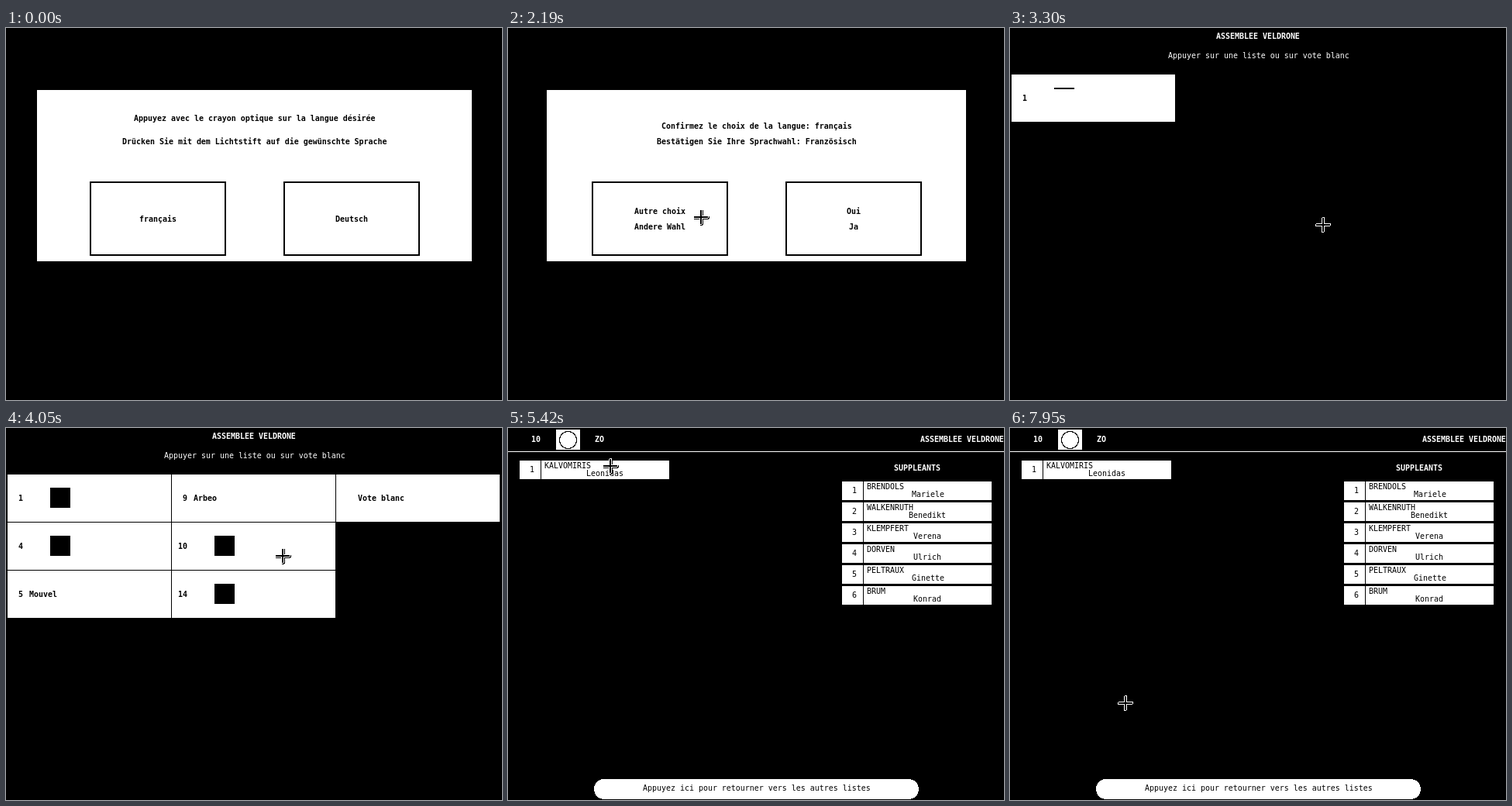
An HTML page for the animation above (7990 ms loop, 640x480 px).

```html
<!DOCTYPE html>
<html lang="fr">
<head>
<meta charset="utf-8">
<title>Vote</title>
<style>
  html, body { margin: 0; height: 100%; overflow: hidden; background: #000; }
  svg { display: block; width: 100vw; height: 100vh; }
  rect, circle, path { shape-rendering: crispEdges; }
  text { font: 9.967px "DejaVu Sans Mono", monospace; white-space: pre; }
  .b { font-weight: bold; }
</style>
</head>
<body>
<svg id="stage" viewBox="0 0 640 480"></svg>
<script>
const LOOP = 7990, STEP = 40;
const stage = document.getElementById('stage');

const rect = (x, y, w, h, fill = '#fff', extra = '') =>
  `<rect x="${x}" y="${y}" width="${w}" height="${h}" fill="${fill}" ${extra}/>`;
const text = (x, y, s, fill = '#000') => `<text x="${x}" y="${y}" fill="${fill}">${s}</text>`;
const bold = (x, y, s, fill = '#000') => `<text class="b" x="${x}" y="${y}" fill="${fill}">${s}</text>`;
const group = (id, ...parts) => `<g id="${id}">${parts.join('')}</g>`;

const TITLE = 'ASSEMBLEE VELDRONE';
const frame = x => rect(x, 199, 174, 94, 'none', 'stroke="#000" stroke-width="2"');
const button = (x, w) => rect(x, 453, w, 26, '#fff', 'rx="13"');

// One ballot cell: number, then a name or a square emblem
function cell(col, row, num, name) {
  const x = 2 + 212 * col, y = 60 + 62 * row;
  return rect(x, y, 211, 61)
    + bold(x + 20 - 6 * String(num).length, y + 34, num)
    + (name ? bold(x + 28, y + 34, name) : '');
}
const emblem = (col, row) => rect(57 + 212 * col, 77 + 62 * row, 26, 26, '#000');

function candidate(x, y, num, last, first) {
  const n = first.length;
  return rect(x, y, 193, 24) + rect(x + 27, y, 1, 24, '#000')
    + text(x + 13, y + 15, num)
    + text(x + 32, y + 10, last)
    + text(x + 110 - 3 * n + n % 2, y + 20, first);
}

const reserves = [
  ['BRENDOLS', 'Mariele'], ['WALKENRUTH', 'Benedikt'], ['KLEMPFERT', 'Verena'],
  ['DORVEN', 'Ulrich'], ['PELTRAUX', 'Ginette'], ['BRUM', 'Konrad']
];

const cross = (color, width, move = '') =>
  `<path d="M0-8V8M-8 0H8" fill="none" stroke="${color}" stroke-width="${width}" stroke-linecap="round" ${move}/>`;

stage.innerHTML = [
  group('language',
    rect(40, 80, 561, 221), frame(109), frame(359),
    bold(165, 120, 'Appuyez avec le crayon optique sur la langue désirée'),
    bold(150, 150, 'Drücken Sie mit dem Lichtstift auf die gewünschte Sprache'),
    bold(172, 250, 'français'), bold(425, 250, 'Deutsch')),
  group('check',
    rect(50, 80, 541, 221), frame(109), frame(359),
    bold(198, 130, 'Confirmez le choix de la langue: français'),
    bold(192, 150, 'Bestätigen Sie Ihre Sprachwahl: Französisch'),
    bold(163, 240, 'Autre choix'), bold(163, 260, 'Andere Wahl'),
    bold(437, 240, 'Oui'), bold(440, 260, 'Ja')),
  group('firstList',
    bold(266, 14, TITLE, '#fff'),
    text(204, 39, 'Appuyer sur une liste ou sur vote blanc', '#fff'),
    cell(0, 0, 1), rect(57, 77, 26, 2, '#000')),
  group('otherLists',
    emblem(0, 0), cell(0, 1, 4), emblem(0, 1), cell(0, 2, 5, 'Mouvel'),
    cell(1, 0, 9, 'Arbeo'), cell(1, 1, 10), emblem(1, 1), cell(1, 2, 14), emblem(1, 2),
    cell(2, 0, '', 'Vote blanc')),
  group('ballot',
    bold(30, 18, '10', '#fff'), rect(62, 2, 31, 26),
    '<circle id="mark" cx="77.5" cy="15.5" r="11" stroke="#000"/>',
    bold(112, 18, 'ZO', '#fff'), bold(532, 18, TITLE, '#fff'),
    rect(0, 30, 640, 1),
    candidate(15, 42, 1, 'KALVOMIRIS', 'Leonidas')),
  group('reserve',
    bold(498, 55, 'SUPPLEANTS', '#fff'),
    ...reserves.map(([last, first], i) => candidate(431, 69 + 27 * i, i + 1, last, first))),
  group('back',
    button(111, 419),
    text(174, 468, 'Appuyez ici pour retourner vers les autres listes')),
  group('decide',
    button(11, 299), button(331, 299),
    text(56, 466, 'Appuyez ici pour annuler votre vote'),
    text(370, 466, 'Appuyez ici pour <tspan class="b">confirmer</tspan> votre vote')),
  group('cursor',
    cross('#000', 4, 'transform="translate(1 1)"'), cross('#fff', 4), cross('#000', 2))
].join('');

// Cursor path: time, centre x, centre y
const path = [
  [1450, 484, 173], [1610, 267, 274], [1870, 267, 274], [2190, 249, 244],
  [2480, 249, 244], [2600, 329, 240], [2760, 435, 250],
  [2890, 435, 250], [3050, 404, 254],
  [3590, 404, 254], [4050, 357, 165],
  [4740, 357, 165], [5540, 92, 28], [5960, 82, 16],
  [6220, 82, 16], [6420, 106, 208], [6500, 111, 223], [6620, 107, 189],
  [6980, 80, 10], [7050, 82, 17], [7090, 81, 15], [7140, 80, 16],
  [7630, 80, 16], [7950, 149, 355]
];

function cursorAt(t) {
  const i = path.findIndex(p => p[0] > t);
  if (i < 0) return path[path.length - 1].slice(1);
  const [t0, x0, y0] = path[i - 1], [t1, x1, y1] = path[i];
  const u = Math.floor((t - t0) / STEP) * STEP / (t1 - t0);
  return [Math.round(x0 + (x1 - x0) * u), Math.round(y0 + (y1 - y0) * u)];
}

const byId = id => document.getElementById(id);
const show = (id, on) => byId(id).setAttribute('display', on ? 'inline' : 'none');

function draw(t) {
  const within = (a, b) => t >= a && t < b;
  const deciding = within(5620, 7380);
  show('language', t < 1830);
  show('check', within(1830, 3300));
  show('firstList', within(3300, 4230));
  show('otherLists', within(3340, 4230));
  show('ballot', t >= 4230);
  show('reserve', t >= 4270);
  show('back', t >= 4270 && !deciding);
  show('decide', deciding);
  byId('mark').setAttribute('fill', within(5580, 7330) ? '#000' : '#fff');
  show('cursor', t >= 1450);
  if (t >= 1450) byId('cursor').setAttribute('transform', `translate(${cursorAt(t)})`);
}

let start;
function tick(now) {
  start ??= now;
  draw((now - start) % LOOP);
  requestAnimationFrame(tick);
}
draw(0);
requestAnimationFrame(tick);
</script>
</body>
</html>
```
